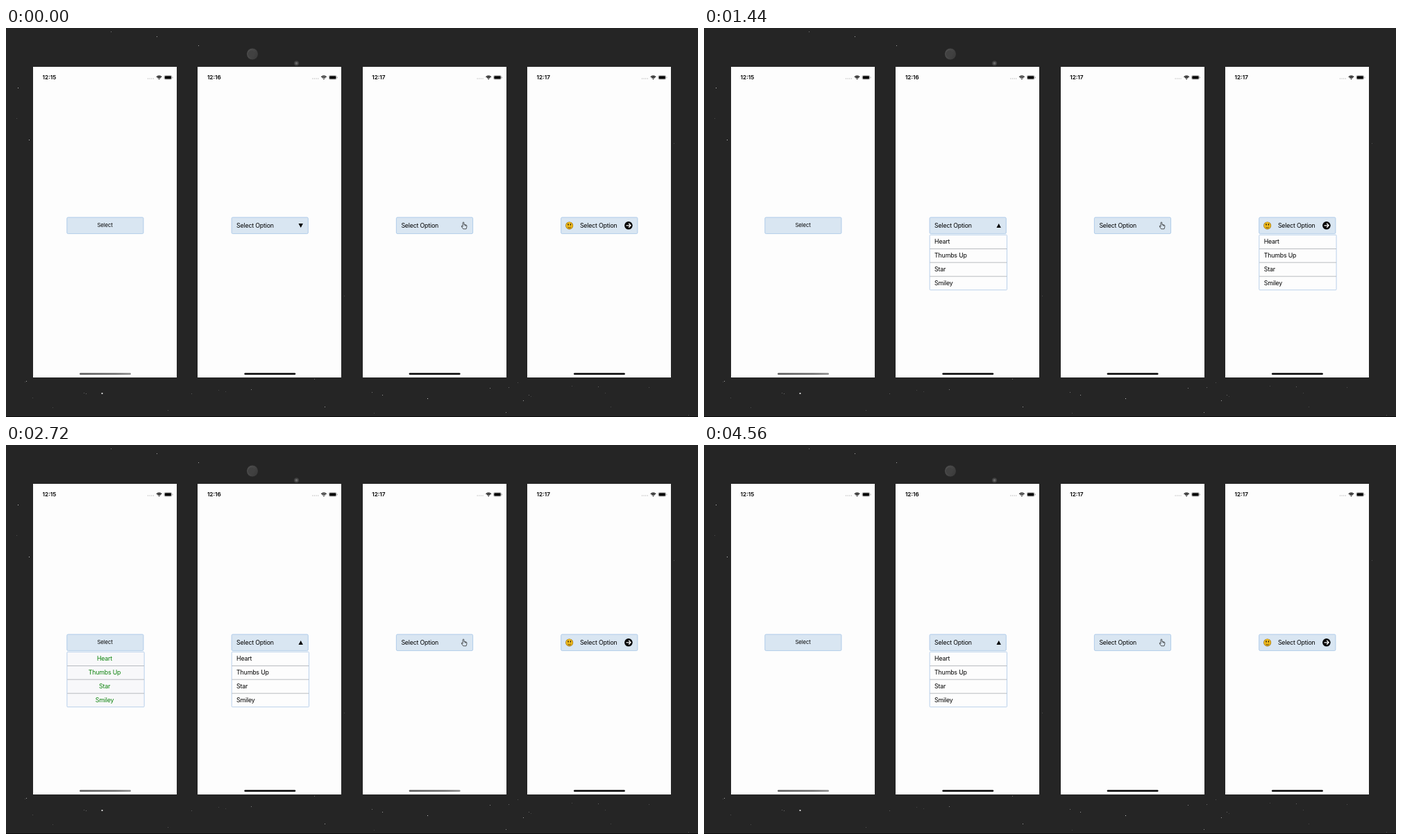
Write an HTML page with a canvas that moves like this. It is 997 by 561 pixels and loops after 4.8 s.

```html
<!DOCTYPE html>
<html lang="en">
<head>
<meta charset="utf-8">
<title>Select dropdowns</title>
<style>
  html, body { margin: 0; width: 100%; height: 100%; overflow: hidden; background: #252525; }
  canvas { display: block; width: 997px; height: 561px; }
</style>
</head>
<body>
<canvas id="stage"></canvas>
<script>
const W = 997, H = 561, LOOP = 4800, STEP = 80;
const HOLD = 240, PRESSED = 0.22;
const PHONE_X = 39, PITCH = 237.3, ROW = 19.85;
const FONT = 'Inter, "Open Sans", sans-serif';
const ITEMS = ['Heart', 'Thumbs Up', 'Star', 'Smiley'];

// A press fades the button and toggles the list after HOLD; a snap toggles it at once.
const PHONES = [
  { clock: '12:15', label: 'Select', centered: true, presses: [2320], snap: 4560, dimBar: [0, LOOP] },
  { clock: '12:16', label: 'Select Option', icon: triangle, presses: [640, 2320, 3200, 4080], snap: 1760 },
  { clock: '12:17', label: 'Select Option', icon: hand, presses: [1520, 2240, 2960], snap: 4000, dimBar: [2640, 3520] },
  { clock: '12:17', label: 'Select Option', icon: arrowBadge, face: true, presses: [880, 2160, 2960, 4160] }
];

const canvas = document.getElementById('stage');
const ratio = window.devicePixelRatio || 1;
canvas.width = W * ratio;
canvas.height = H * ratio;
const ctx = canvas.getContext('2d');
ctx.scale(ratio, ratio);

function seededRandom(seed) {
  return () => (seed = (seed * 16807) % 2147483647) / 2147483647;
}

function rect(x, y, w, h, r, fill, stroke, line = 0.8) {
  ctx.beginPath();
  ctx.roundRect(x, y, w, h, r);
  if (fill) { ctx.fillStyle = fill; ctx.fill(); }
  if (stroke) { ctx.strokeStyle = stroke; ctx.lineWidth = line; ctx.stroke(); }
}

function disc(x, y, r, fill) {
  ctx.beginPath();
  ctx.arc(x, y, r, 0, Math.PI * 2);
  ctx.fillStyle = fill;
  ctx.fill();
}

function arc(x, y, r, from, to, color, line) {
  ctx.beginPath();
  ctx.arc(x, y, r, from * Math.PI, to * Math.PI);
  ctx.strokeStyle = color;
  ctx.lineWidth = line;
  ctx.stroke();
}

function text(str, x, y, { size = 8.8, weight = 400, color = '#000', align = 'left', spacing = -0.18 } = {}) {
  ctx.font = `${weight} ${size}px ${FONT}`;
  ctx.letterSpacing = spacing + 'px';
  ctx.textAlign = align;
  ctx.fillStyle = color;
  ctx.fillText(str, x, y);
}

function stars() {
  const random = seededRandom(2024);
  for (let i = 0; i < 50; i++) {
    const x = random() * W;
    const y = i % 2 ? 506 + random() * 50 : random() * H;
    const light = 70 + 140 * random() ** 3;
    ctx.fillStyle = `rgb(${light}, ${light}, ${light})`;
    ctx.fillRect(Math.floor(x), Math.floor(y), 1, 1);
  }
  disc(138.5, 527, 1.1, '#f0f0f0');
}

function background() {
  ctx.fillStyle = '#252525';
  ctx.fillRect(0, 0, W, H);
  ctx.fillStyle = '#0c0c0c';
  ctx.fillRect(0, H - 1, W, 1);
  stars();

  const moon = ctx.createLinearGradient(347, 33, 363, 41);
  moon.addColorStop(0, '#505050');
  moon.addColorStop(1, '#393939');
  disc(355, 37.5, 8, moon);
  disc(353.5, 37.5, 5, '#414141');
  disc(418.5, 50.8, 3.6, '#414141');
  disc(418.5, 50.8, 1.9, '#686868');
}

function statusBar(x, clock) {
  text(clock, x + 13.6, 74.1, { size: 8.2, weight: 600, spacing: 0 });
  for (let i = 0; i < 4; i++) disc(x + 165.6 + i * 2.6, 73, 0.7, '#bbb');

  const wifiX = x + 181.6, wifiY = 74.3;
  for (const r of [0.9, 3.2, 5.2]) arc(wifiX, wifiY, r, -0.75, -0.25, '#000', 1.4);

  rect(x + 188.9, 68.5, 11, 5.6, 1.6, null, '#999', 0.6);
  rect(x + 189.7, 69.2, 9.4, 4.2, 0.9, '#000');
  rect(x + 200.6, 70.4, 0.8, 1.9, 0.4, '#999');
}

function homeBar(x, dim) {
  let fill = '#050505';
  if (dim) {
    fill = ctx.createLinearGradient(x + 67, 0, x + 141, 0);
    fill.addColorStop(0, '#585858');
    fill.addColorStop(0.7, '#6c6c6c');
    fill.addColorStop(1, '#8c8c8c');
  }
  rect(x + 67, 497.4, 74, 2.7, 1.35, fill);
}

function triangle(x, open) {
  const tip = open ? -2.9 : 2.9, cx = x + 148.4;
  ctx.beginPath();
  ctx.moveTo(cx - 3.2, 285 - tip);
  ctx.lineTo(cx + 3.2, 285 - tip);
  ctx.lineTo(cx, 285 + tip);
  ctx.fillStyle = '#000';
  ctx.fill();
}

function hand(x) {
  ctx.save();
  ctx.translate(x + 146.3, 284.8);
  ctx.strokeStyle = '#222';
  ctx.lineWidth = 0.75;
  ctx.lineJoin = 'round';
  ctx.stroke(new Path2D(`M-1.8 1.6 V-4.2 Q-.9 -5.8 0 -4.2 V-1.3 L2.9 -.8 Q4.1 -.5 4 .8
    Q4 3 3.1 5 H-1.1 Q-2.6 3.4 -3.8 1 Q-3.4 -.4 -1.8 1.6 M1.4 -1 V.6 M2.8 -.7 V.8`));
  ctx.restore();
}

function arrowBadge(x) {
  const cx = x + 146, cy = 284.8;
  disc(cx, cy, 5.8, '#000');
  ctx.save();
  ctx.translate(cx, cy);
  ctx.strokeStyle = '#fff';
  ctx.lineWidth = 1.3;
  ctx.stroke(new Path2D('M-3.4 0 H3 M.3 -3 L3.2 0 L.3 3'));
  ctx.restore();
}

function smiley(x) {
  const cx = x + 60.8, cy = 284.9;
  disc(cx, cy, 5.5, '#8d6410');
  disc(cx, cy, 4.9, '#f3bd1c');
  ctx.fillStyle = '#3b2a08';
  for (const dx of [-1.7, 1.7]) {
    ctx.beginPath();
    ctx.ellipse(cx + dx, cy - 1.4, 0.75, 1.4, 0, 0, Math.PI * 2);
    ctx.fill();
  }
  arc(cx, cy + 0.2, 3, 0.2, 0.8, '#4b350a', 0.9);
}

function button(phone, x, open, opacity) {
  ctx.save();
  ctx.globalAlpha = opacity;
  rect(x + 48.8, 273.1, 110.2, 23.5, 1.6, '#d9e6f2', '#a3c3e6');
  if (phone.centered) {
    text(phone.label, x + 103.6, 287.3, { size: 7.7, align: 'center', spacing: -0.08 });
  } else {
    text(phone.label, x + (phone.face ? 76 : 55.8), 288.1);
  }
  if (phone.face) smiley(x);
  if (phone.icon) phone.icon(x, open);
  ctx.restore();
}

function list(x, centered) {
  rect(x + 48.9, 298.4, 111.3, 4 * ROW, 1, centered ? '#f8f8fa' : '#fdfdfd', '#a9c6e6');
  const style = centered ? { align: 'center', color: '#0b820b' } : {};
  ITEMS.forEach((item, i) => {
    const y = 308.3 + i * ROW;
    if (i) rect(x + 49.2, y - 10.2, 110.8, 0.8, 0, '#a2a6ac');
    text(item, x + (centered ? 103 : 55.8), y + 3.1, style);
  });
}

function stateAt({ presses, snap }, t) {
  let open = t >= snap, opacity = 1;
  for (const press of presses) {
    const age = t - press;
    if (age < 0) break;
    if (age >= HOLD) open = !open;
    const released = Math.max(0, age - HOLD + STEP) / (2 * STEP);
    opacity = Math.min(1, PRESSED + (1 - PRESSED) * released);
  }
  return { open, opacity };
}

function draw(t) {
  background();
  PHONES.forEach((phone, i) => {
    const x = PHONE_X + i * PITCH;
    const { open, opacity } = stateAt(phone, t);
    const [dimFrom, dimTo] = phone.dimBar || [];
    rect(Math.round(x), 56, 207, 448, 0, '#fdfdfd');
    statusBar(x, phone.clock);
    homeBar(x, t >= dimFrom && t < dimTo);
    button(phone, x, open, opacity);
    if (open) list(x, phone.centered);
  });
}

const start = performance.now();
function tick() {
  const t = (performance.now() - start) % LOOP;
  draw(Math.floor(t / STEP) * STEP);
  requestAnimationFrame(tick);
}
tick();
</script>
</body>
</html>
```
